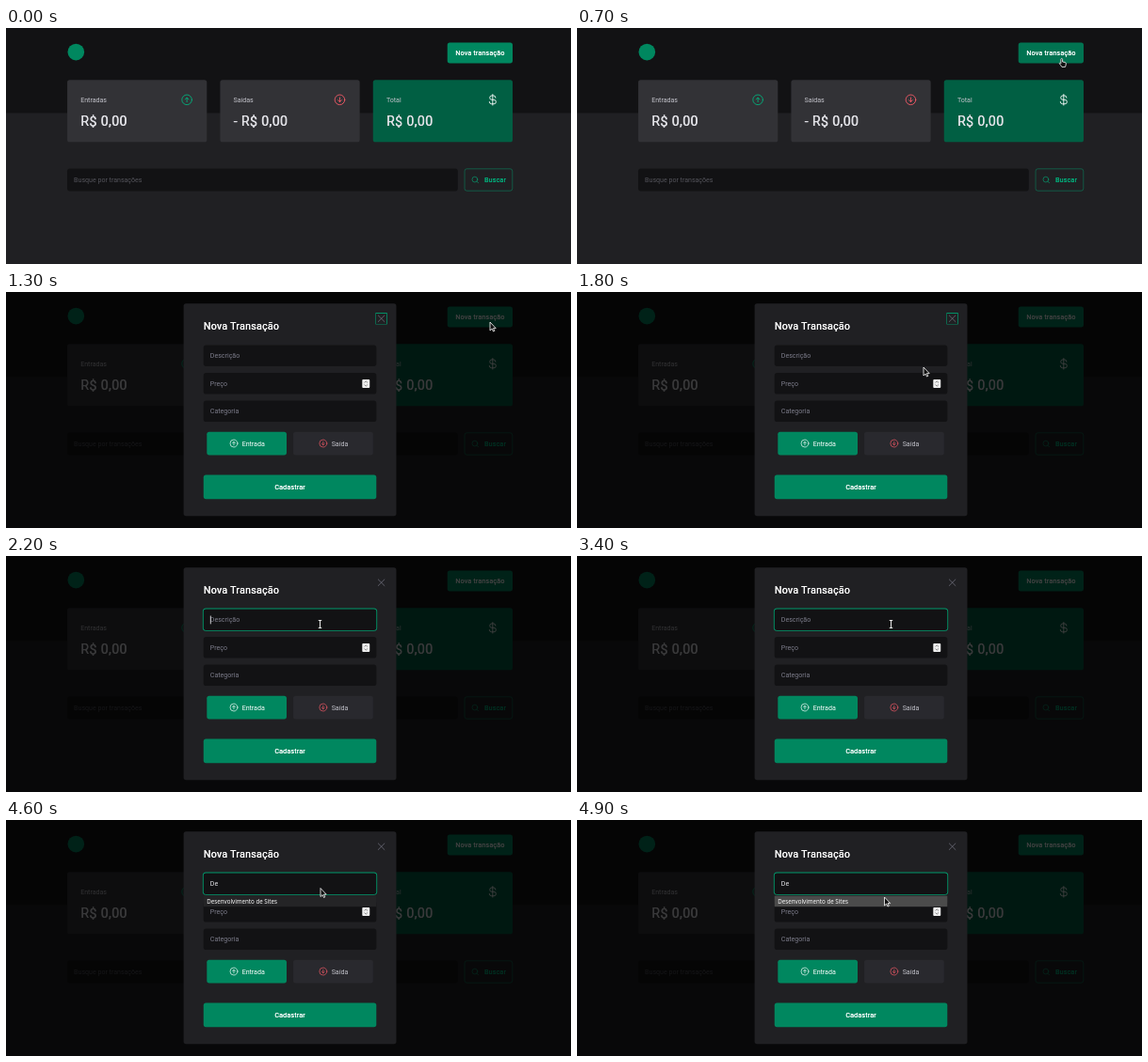
Write an HTML page that moves like this. It is 600 px wide and 251 px high and loops after 5000 ms.

```html
<!DOCTYPE html>
<html lang="pt-BR">
<head>
<meta charset="utf-8">
<title>Nova transação</title>
<style>
html, body { margin: 0; width: 100%; height: 100%; overflow: hidden; background: #202023; }
#stage { position: relative; width: 600px; height: 251px; overflow: hidden; background: #202023; }
#page {
  position: absolute; left: 0; top: 0; width: 1366px; height: 580px;
  transform-origin: 0 0; transform: translate(.2px, -2.2px) scale(.44118);
  font: 400 16px Roboto, sans-serif; color: #e1e1e6; white-space: nowrap;
}
#page div, #page svg { position: absolute; box-sizing: border-box; }
#page svg { fill: none; stroke: currentColor; stroke-width: 16; stroke-linecap: round; stroke-linejoin: round; }
.header { left: -1px; top: 0; width: 1368px; height: 210px; background: #121214; }
.logo { left: 148px; top: 43px; width: 40px; height: 40px; border-radius: 50%; background: #00875f; }
.btn, .field { display: flex; align-items: center; border-radius: 6px; }
.btn { justify-content: center; color: #fff; background: #00875f; }
/* Regular weight smeared sideways, as a browser fakes bold */
.bold { letter-spacing: .028em; text-shadow: .028em 0 currentColor; }
#page .btn svg { position: static; }
.field { padding-left: 16px; background: #121214; color: #7c7c8a; }
#new { left: 1062px; top: 40px; width: 157px; height: 50px; }
.card { top: 130px; width: 336px; height: 150px; border-radius: 6px; background: #323236; }
.card .label { left: 32px; top: 32px; line-height: 32px; color: #c4c4cc; }
.card .value { left: 32px; top: 80px; line-height: 38px; font-size: 32px; }
.card svg { left: 272px; top: 32px; width: 32px; height: 32px; }
.search { left: 147px; top: 344px; width: 940px; height: 54px; color: #54545b; }
#page .find { left: 1103px; top: 344px; width: 116px; height: 54px; gap: 12px; border: 1.5px solid #00a574; background: none; color: #00b37e; }
#modal { left: 0; top: 0; width: 1366px; height: 580px; }
.shade { left: -1px; top: 0; width: 1368px; height: 580px; background: rgba(0, 0, 0, .75); }
.dialog { left: 427px; top: 33px; width: 512px; height: 512px; border-radius: 6px; background: #202023; }
.title { left: 48px; top: 40px; line-height: 28px; font-size: 24px; color: #fff; }
#close { left: 464px; top: 24px; width: 24px; height: 24px; color: #7c7c8a; }
.dialog .field { left: 48px; width: 416px; height: 51px; }
.dialog .btn { gap: 8px; }
.type { top: 309px; width: 192px; height: 56px; }
.save { left: 48px; top: 413px; width: 416px; height: 58px; }
.spin { left: 382px; top: 16px; width: 18px; height: 20px; border-radius: 2px; background: #efefef; color: #555; }
#caret { left: 16px; top: 16px; width: 2px; height: 20px; background: #e1e1e6; }
#hint {
  left: 48px; top: 155px; width: 416px; height: 26px; padding-left: 8px;
  font: 500 14px/26px "Noto Sans", "Open Sans", sans-serif; color: #fff;
}
#cursors { position: absolute; left: 0; top: 0; width: 600px; height: 251px; }
#cursors path { fill: #111; stroke: #fff; stroke-width: .8; stroke-linejoin: round; }
#cursors #beam { fill: none; stroke: #e8e8e8; stroke-width: 1; }
</style>
</head>
<body>
<div id="stage">
  <div id="page">
    <div class="header"></div>
    <div class="logo"></div>
    <div class="btn bold" id="new">Nova transação</div>
    <div id="cards"></div>
    <div class="field search">Busque por transações</div>
    <div class="btn bold find">
      <svg width="20" height="20" viewBox="0 0 256 256"><circle cx="116" cy="116" r="84"/><path d="M176 176l48 48"/></svg>Buscar
    </div>
    <div id="modal">
      <div class="shade"></div>
      <div class="dialog">
        <div class="title bold">Nova Transação</div>
        <div id="close"><svg width="24" height="24" viewBox="0 0 256 256"><path d="M48 48L208 208M208 48L48 208"/></svg></div>
        <div class="field" id="desc" style="top:100px"><span id="typed"></span><div id="caret"></div></div>
        <div class="field" style="top:167px">Preço
          <div class="spin"><svg width="18" height="20" viewBox="0 0 18 20" style="stroke-width:1.6"><path d="M6 7l3-3 3 3M6 13l3 3 3-3"/></svg></div>
        </div>
        <div class="field" style="top:234px">Categoria</div>
        <div class="btn type" id="income" style="left:56px">Entrada</div>
        <div class="btn type" id="outcome" style="left:264px;background:#29292e;color:#c4c4cc">Saída</div>
        <div class="btn bold save">Cadastrar</div>
        <div id="hint">Desenvolvimento de Sites</div>
      </div>
    </div>
  </div>
  <svg id="cursors">
    <path id="arrow" d="M0 0V9L2.1 7.1L3.5 10L4.8 9.4L3.5 6.6H6.2Z"/>
    <path id="hand" d="M1 .6C1.6.2 2.3.6 2.3 1.3V4L5 4.5C5.8 4.7 6 5.2 6 5.9C6 7.3 5.6 8.3 5.2 9.4H1.6C1 8.2-.2 7-.9 5.9C-1.2 5.2-.4 4.7.2 5.2L.6 5.6V1.3Z"/>
    <path id="beam" d="M-1.7-4H1.7M0-4V4M-1.7 4H1.7"/>
  </svg>
</div>
<script>
const LOOP = 5000, STEP = 100;
const $ = id => document.getElementById(id);

const icon = (body, color, size) =>
  `<svg width="${size}" height="${size}" viewBox="0 0 256 256" style="color:${color}">${body}</svg>`;
const ring = '<circle cx="128" cy="128" r="96"/>';
const up = ring + '<path d="M128 170V88M94 121l34-34 34 34"/>';
const down = ring + '<path d="M128 86v82M94 135l34 34 34-34"/>';
const dollar = '<path d="M128 24v208M184 88a40 40 0 0 0-40-40h-32a40 40 0 0 0 0 80h40a40 40 0 0 1 0 80h-48a40 40 0 0 1-40-40"/>';

const cards = [
  ['Entradas', 'R$ 0,00', up, '#00b37e', '#323236'],
  ['Saídas', '- R$ 0,00', down, '#f75a68', '#323236'],
  ['Total', 'R$ 0,00', dollar, '#fff', '#015f43'],
];
$('cards').innerHTML = cards.map(([label, value, art, color, bg], i) =>
  `<div class="card" style="left:${147 + i * 368}px;background:${bg}">
    <div class="label">${label}</div>${icon(art, color, 32)}<div class="value bold">${value}</div>
  </div>`).join('');
$('income').insertAdjacentHTML('afterbegin', icon(up, '#fff', 24));
$('outcome').insertAdjacentHTML('afterbegin', icon(down, '#f75a68', 24));

// [time, x, y, pointer shape]
const moves = [
  [0, 0, 0, ''],
  [100, 551, 228, 'arrow'], [200, 552, 190, 'arrow'], [300, 552, 155, 'arrow'],
  [500, 547, 115, 'arrow'], [600, 528, 60, 'arrow'], [700, 513.3, 32, 'hand'],
  [1300, 514, 32, 'arrow'],
  [1500, 496, 42, 'arrow'], [1600, 455, 62, 'arrow'], [1700, 408, 78, 'arrow'],
  [1800, 368, 80, 'arrow'], [1900, 343, 76, 'beam'], [2000, 333.5, 72.5, 'beam'],
  [3700, 334, 72.5, 'arrow'], [4900, 326.5, 82, 'arrow'],
];
const shapes = ['arrow', 'hand', 'beam'];
const texts = [[0, ''], [3600, 'D'], [4100, 'De']];
const carets = [[0, 0], [2100, 1], [3400, 0], [3600, 1], [4600, 0]];

const at = (table, t) => table.filter(row => row[0] <= t).pop();
const clamp = v => Math.max(0, Math.min(1, v));
const mix = (a, b, k) => `rgb(${a.map((v, i) => Math.round(v + (b[i] - v) * k))})`;
const glow = on => on ? '0 0 0 2px #009a6c' : 'none';
const show = (el, on) => { el.style.visibility = on ? 'visible' : 'hidden'; };

function draw(t) {
  const open = t >= 1300, focused = t >= 2100;
  const hover = open ? 0 : clamp((t - 600) / 200);
  $('new').style.background = mix([0, 135, 95], [1, 95, 67], hover);
  $('new').style.boxShadow = glow(t >= 1000 && !open);
  $('modal').style.display = open ? 'block' : 'none';
  $('close').style.boxShadow = glow(!focused);
  $('desc').style.boxShadow = glow(focused);

  const text = at(texts, t)[1];
  $('typed').textContent = text || 'Descrição';
  $('typed').style.color = text ? '#e1e1e6' : '';
  $('caret').style.left = 16 + (text ? $('typed').offsetWidth : 0) + 'px';
  $('caret').style.opacity = at(carets, t)[1];

  $('hint').style.display = t >= 3700 ? 'block' : 'none';
  $('hint').style.background = t >= 4900 ? '#4b4b4b' : '#242426';

  const [, x, y, shape] = at(moves, t);
  for (const name of shapes) {
    show($(name), name === shape);
    $(name).setAttribute('transform', `translate(${x} ${y})`);
  }
}

const start = performance.now();
let last = -1;
function tick() {
  const t = Math.floor((performance.now() - start) % LOOP / STEP) * STEP;
  if (t !== last) draw(last = t);
  requestAnimationFrame(tick);
}
tick();
</script>
</body>
</html>
```
